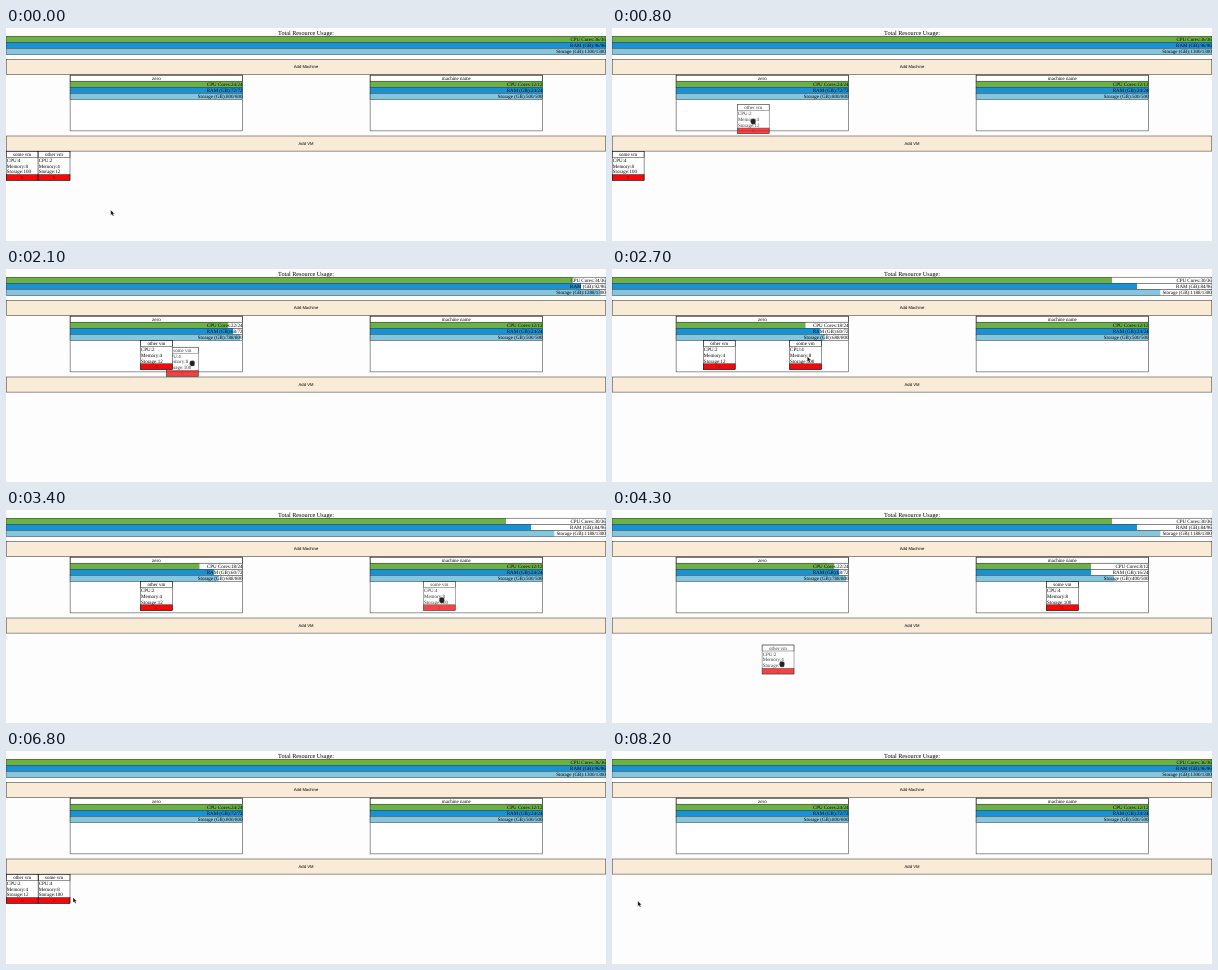
Recreate the animation shown at these times as an HTML page. Size 600x213 px, loop 8.3 s.

```html
<!DOCTYPE html>
<html lang="en">
<head>
<meta charset="utf-8">
<title>VM allocation</title>
<style>
  html, body { margin: 0; width: 100%; height: 100%; overflow: hidden; background: #fdfdfd; }
  svg { display: block; width: 600px; height: 213px; }
  text { font: 5px "Liberation Serif", "Times New Roman", serif; fill: #000; text-rendering: geometricPrecision; }
  .title { font-size: 6.2px; }
  .button { font: 4.2px "Liberation Sans", Arial, sans-serif; }
  .mid { text-anchor: middle; }
  .end { text-anchor: end; }
  .remove { font-size: 4.4px; fill: #900; }
  .line { fill: none; stroke: #111; stroke-width: .45; }
</style>
</head>
<body>
<svg id="stage" viewBox="0 0 600 213"></svg>
<script>
const LOOP = 8300, STEP = 100;
const CARD_W = 31.9, CARD_H = 29, ROW = 6.05;
const stage = document.getElementById('stage');

function add(parent, tag, attrs, content) {
  const el = document.createElementNS('http://www.w3.org/2000/svg', tag);
  for (const k in attrs) el.setAttribute(k, attrs[k]);
  if (content) el.textContent = content;
  return parent.appendChild(el);
}
const box = (parent, x, y, width, height, fill) => add(parent, 'rect', { x, y, width, height, fill });
const frame = (parent, x, y, width, height) => add(parent, 'rect', { x, y, width, height, class: 'line' });
const label = (parent, x, y, cls, content) => add(parent, 'text', { x, y, class: cls }, content);

const RESOURCES = [
  ['CPU Cores', '#6db144'],
  ['RAM (GB)', '#1793d5'],
  ['Storage (GB)', '#82c6e0']
];

// Three stacked resource bars; returns a function that shows the free amounts.
function meter(x, y, width, max) {
  const rows = RESOURCES.map(([name, color], i) => {
    const top = y + i * ROW;
    box(stage, x, top, width, ROW, '#fff');
    const bar = box(stage, x, top, width, ROW, color);
    frame(stage, x, top, width, ROW);
    return { name, bar, text: label(stage, x + width - .2, top + 4.6, 'end') };
  });
  return free => rows.forEach((row, i) => {
    row.bar.setAttribute('width', width * free[i] / max[i]);
    row.text.textContent = `${row.name}:${free[i]}/${max[i]}`;
  });
}

function band(y, height, content) {
  box(stage, 0, y, 600, height, '#faebd7');
  frame(stage, .2, y, 599.6, height);
  label(stage, 300, y + height / 2 + 1.4, 'button mid', content);
}

function machine(name, x, max) {
  const width = 172.5;
  box(stage, x, 47.1, width, 55.8, '#fff');
  frame(stage, x, 47.1, width, 55.8);
  frame(stage, x, 47.1, width, 6.1);
  label(stage, x + width / 2, 51.7, 'mid', name);
  return { x, width, max, show: meter(x, 53.2, width, max) };
}

function card(name, use) {
  const g = add(stage, 'g', {});
  box(g, 0, 0, CARD_W, CARD_H, '#fff');
  label(g, CARD_W / 2, 4.7, 'mid', name);
  ['CPU', 'Memory', 'Storage'].forEach((key, i) =>
    label(g, .6, 10.6 + i * 5.7, '', `${key}:${use[i]}`));
  box(g, 0, 23.3, CARD_W, 5.7, '#f40808');
  label(g, CARD_W / 2, 27.6, 'remove mid', 'X');
  frame(g, 0, 0, CARD_W, 6);
  frame(g, 0, 0, CARD_W, CARD_H);
  frame(g, 0, 23.3, CARD_W, 5.7);
  return { g, use };
}

label(stage, 300, 6.8, 'title mid', 'Total Resource Usage:');
const TOTAL = [36, 96, 1300];
const showTotal = meter(0, 8.2, 600, TOTAL);
band(31.4, 15.2, 'Add Machine');
const machines = {
  zero: machine('zero', 64.1, [24, 72, 800]),
  spare: machine('machine name', 364.1, [12, 24, 500])
};
band(108, 15.1, 'Add VM');
const vms = {
  some: card('some vm', [4, 8, 100]),
  other: card('other vm', [2, 4, 12])
};

const arrow = add(stage, 'path', {
  d: 'M0 0V5.2L1.2 4.2L2.1 6.1L3.1 5.7L2.3 3.8H3.8Z',
  fill: '#111', stroke: '#fff', 'stroke-width': .3
});
const fist = add(stage, 'path', {
  d: 'M-2.2 -1.4Q-1.7 -2.8 -.8 -2.3Q0 -3.1 .8 -2.3Q2.4 -2.5 2.4 -.9V.8Q2.2 2.6 1.4 2.9H-1.2Q-2.6 1.4 -2.6 .2Z',
  fill: '#222', stroke: '#777', 'stroke-width': .3
});

// Pointer path: time, x, y.
const PATH = [
  [0, 104.7, 182], [400, 48, 140], [900, 152, 88], [1000, 150, 87],
  [1400, 26, 139.3], [1700, 102, 130.3], [2200, 196, 90], [2700, 195.3, 87.5],
  [2900, 196, 90], [3500, 455, 90], [3600, 455, 90], [4000, 154.3, 90.5],
  [4300, 170, 154], [4600, 168, 154], [5400, 444, 146.3], [5700, 455, 90],
  [6200, 30, 138], [6800, 67, 146.4], [7100, 49, 149], [7300, 48, 149],
  [7500, 27, 150], [7700, 25.5, 149.8], [7900, 25.8, 150]
];

// Time, VM, what happens: lifted, placed somewhere, or removed.
const EVENTS = [
  [400, 'other', 'lift'], [900, 'other', 'zero'],
  [1400, 'some', 'lift'], [2200, 'some', 'zero'],
  [2900, 'some', 'lift'], [3600, 'some', 'spare'],
  [4000, 'other', 'lift'], [4600, 'other', 'pool'],
  [5700, 'some', 'lift'], [6200, 'some', 'pool'],
  [7100, 'some', 'remove'], [7500, 'other', 'remove']
];

const smooth = k => k * k * (3 - 2 * k);

function pointer(t) {
  const i = PATH.findIndex(p => p[0] > t);
  if (i < 0) return PATH[PATH.length - 1].slice(1);
  const [t0, x0, y0] = PATH[i - 1], [t1, x1, y1] = PATH[i];
  const k = smooth((t - t0) / (t1 - t0));
  return [x0 + (x1 - x0) * k, y0 + (y1 - y0) * k];
}

function spot(list, id, place) {
  const i = list.indexOf(id);
  if (place === 'pool') return [.2 + i * CARD_W, 123.3];
  const m = machines[place];
  return [m.x + m.width * (i + .5) / list.length - CARD_W / 2, 71.5];
}

function draw(t) {
  const places = { pool: ['some', 'other'], zero: [], spare: [] };
  const home = { some: 'pool', other: 'pool' };
  let held = null, grip;

  for (const [time, id, action] of EVENTS) {
    if (time > t) break;
    const list = places[home[id]];
    if (action === 'lift') {
      const [x, y] = spot(list, id, home[id]), [px, py] = pointer(time);
      held = id;
      grip = [px - x, py - y];
    }
    if (list.includes(id)) list.splice(list.indexOf(id), 1);
    if (action === 'lift') continue;
    held = null;
    home[id] = action;
    if (places[action]) places[action].push(id);
  }

  const [px, py] = pointer(t);
  for (const id in vms) {
    const { g } = vms[id], place = home[id];
    const lifted = id === held;
    g.setAttribute('visibility', place === 'remove' ? 'hidden' : 'visible');
    g.setAttribute('opacity', lifted ? .76 : 1);
    if (place === 'remove') continue;
    const [x, y] = lifted ? [px - grip[0], py - grip[1]] : spot(places[place], id, place);
    g.setAttribute('transform', `translate(${x} ${y})`);
  }

  // A lifted VM still counts against the machine it came from.
  const free = TOTAL.slice();
  for (const name in machines) {
    const m = machines[name], left = m.max.slice();
    for (const id in vms) {
      if (home[id] !== name) continue;
      vms[id].use.forEach((n, i) => { left[i] -= n; free[i] -= n; });
    }
    m.show(left);
  }
  showTotal(free);

  arrow.setAttribute('visibility', held ? 'hidden' : 'visible');
  fist.setAttribute('visibility', held ? 'visible' : 'hidden');
  (held ? fist : arrow).setAttribute('transform', `translate(${px} ${py})`);
}

const start = performance.now();
function tick() {
  const t = (performance.now() - start) % LOOP;
  draw(Math.floor(t / STEP) * STEP);
  requestAnimationFrame(tick);
}
tick();
</script>
</body>
</html>
```
